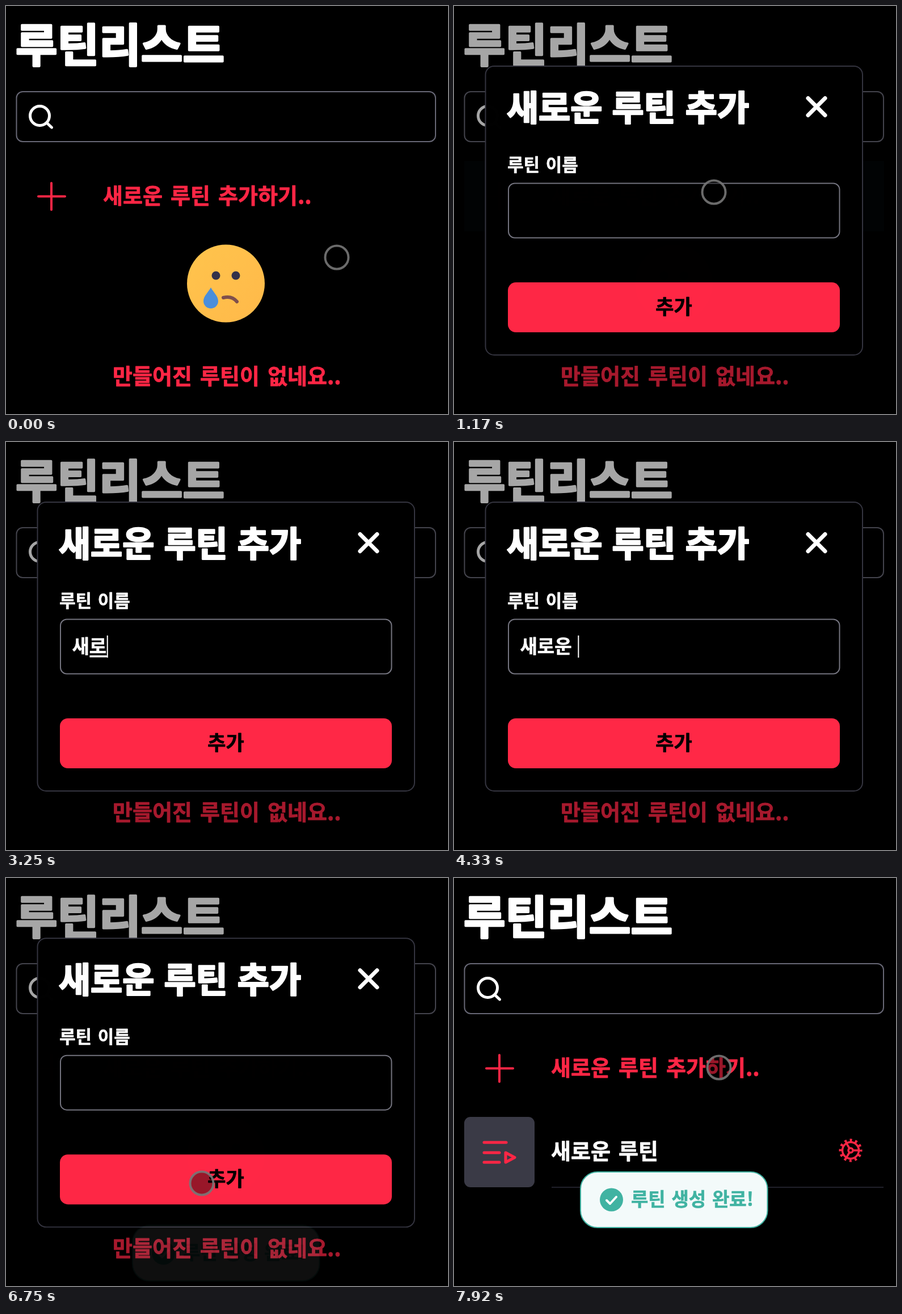
An HTML page for the animation above (8000 ms loop, 779x719 px).

```html
<!DOCTYPE html>
<html lang="ko">
<head>
<meta charset="utf-8">
<title>루틴리스트</title>
<style>
  html, body { margin: 0; width: 779px; height: 719px; overflow: hidden; background: #000; }
  svg { display: block; }
  text {
    font-family: "Noto Sans CJK KR", "Noto Sans CJK", "Noto Sans KR", sans-serif;
    font-weight: 900; font-size: 38px; word-spacing: 3.5px; white-space: pre;
    fill: var(--ink); stroke: var(--ink); stroke-width: .02em; stroke-linejoin: round;
  }
  .heavy { stroke-width: .045em; }
  .line { fill: none; stroke: var(--ink); stroke-linecap: round; stroke-linejoin: round; }
  .white { --ink: #fff; }
  .red { --ink: #ff2645; }
  .teal { --ink: #40b3a2; }
  .black { --ink: #000; }

  /* 1% = 80ms */
  svg [id] { animation: 8s infinite linear both; }
  #press { animation-name: press; }
  #empty { animation-name: empty; }
  #list { animation-name: list; }
  #dim { animation-name: dim; }
  #modal { animation-name: modal; }
  #toast { animation-name: toast; }
  #cursor { animation-name: cursor; }

  @keyframes press {
    0%, 8.1% { opacity: 0; }
    8.6%, 12.5% { opacity: 1; }
    15%, 100% { opacity: 0; }
  }
  @keyframes empty {
    0% { visibility: visible; animation-timing-function: step-end; }
    84.9%, 100% { visibility: hidden; }
  }
  @keyframes list {
    0% { visibility: hidden; animation-timing-function: step-end; }
    84.9%, 100% { visibility: visible; }
  }
  @keyframes dim {
    0%, 9.3% { opacity: 0; animation-timing-function: cubic-bezier(.16, .84, .44, 1); }
    14.7%, 84.25% { opacity: .35; animation-timing-function: cubic-bezier(.56, 0, .84, .16); }
    89.6%, 100% { opacity: 0; }
  }
  @keyframes modal {
    0%, 9.3% { opacity: 0; transform: translateY(100px); animation-timing-function: ease-in-out; }
    14.7%, 84.25% { opacity: 1; transform: none; animation-timing-function: ease-in-out; }
    89.6%, 100% { opacity: 0; transform: translateY(100px); }
  }
  @keyframes toast {
    0%, 83.2% { opacity: 0; transform: translateY(100px); animation-timing-function: ease-in-out; }
    90.14%, 100% { opacity: 1; transform: none; }
  }
  @keyframes cursor {
    0%, 1% { transform: translate(583px, 443px); animation-timing-function: ease-in-out; }
    8.75%, 18% { transform: translate(458px, 328px); animation-timing-function: ease-in; }
    26% { transform: translate(556px, 388px); animation-timing-function: ease-out; }
    28.5% { transform: translate(566px, 394px); opacity: 1; }
    34.3% { opacity: 1; animation-timing-function: step-end; }
    34.4% { opacity: 0; }
    74.9% { opacity: 0; animation-timing-function: step-end; }
    75% { transform: translate(566px, 394px); opacity: 1; animation-timing-function: ease-in-out; }
    82%, 88% { transform: translate(345px, 538px); animation-timing-function: ease-in-out; }
    95%, 100% { transform: translate(467px, 334px); }
  }
</style>
</head>
<body>
<svg width="779" height="719" viewBox="0 0 779 719">
  <defs>
    <linearGradient id="face" x2="1" y2="1">
      <stop stop-color="#ffc44c"/><stop offset="1" stop-color="#ffb94a"/>
    </linearGradient>
  </defs>
  <rect width="779" height="719"/>

  <g class="white">
    <text class="heavy" x="17" y="98" style="font-size:80px">루틴리스트</text>
    <rect x="18.5" y="151" width="738.5" height="88" rx="11" fill="none" stroke="#686876" stroke-width="2"/>
    <g class="line" stroke-width="5">
      <circle cx="59.5" cy="193.5" r="17"/>
      <path d="M72 206l8.5 8"/>
    </g>
  </g>

  <rect id="press" x="18" y="273" width="740" height="124" fill="#121b2a"/>
  <g class="red">
    <path class="line" stroke-width="4" d="M80 312v47M57 335.500h47"/>
    <text x="171" y="348">새로운 루틴 추가하기..</text>
  </g>

  <g id="empty" class="red">
    <circle cx="387.500" cy="489" r="68.500" fill="url(#face)"/>
    <g fill="#34324a"><circle cx="370" cy="475" r="7.5"/><circle cx="405" cy="475" r="7.5"/></g>
    <path d="M383 514Q398 510 407 521" fill="none" stroke="#7f4f4c" stroke-width="6" stroke-linecap="round"/>
    <path d="M361 496C365 504 374 511 374 520A13 13 0 0 1 348 520C348 511 357 504 361 496Z" fill="#4a8edb"/>
    <text x="188" y="666">만들어진 루틴이 없네요..</text>
  </g>

  <g id="list">
    <rect x="18" y="421" width="124" height="124" rx="11" fill="#3a3a46"/>
    <path d="M172 545H757" stroke="#2b2b38" stroke-width="1.500"/>
    <text class="white" x="171" y="495">새로운 루틴</text>
    <g class="red">
      <path class="line" stroke-width="5" d="M53 466H92M53 484H80M53 501H80M91 484L107 492.500L91 501Z"/>
      <g class="line" transform="translate(699 480)" stroke-width="3.5">
        <circle r="14.500"/>
        <circle r="18" stroke-width="5" stroke-linecap="butt" stroke-dasharray="4 5.425" stroke-dashoffset="2"/>
        <circle r="4"/>
        <path d="M4 0H14M-2 -3.500L-7 -12M-2 3.500L-7 12"/>
      </g>
    </g>
  </g>

  <rect id="dim" width="779" height="719"/>

  <g id="modal" class="white">
    <rect x="55.500" y="106" width="664.500" height="509" rx="15" fill="#000" stroke="#353540" stroke-width="2"/>
    <text class="heavy" x="93" y="202" style="font-size:61px;word-spacing:0">새로운 루틴 추가</text>
    <path class="line" stroke-width="7" d="M624 162.500L654 192.500M654 162.500L624 192.500"/>
    <text x="94" y="290.500" style="font-size:31px;word-spacing:2px">루틴 이름</text>
    <rect x="96" y="312.500" width="583.500" height="96" rx="11" fill="none" stroke="#74747f" stroke-width="2"/>
    <text class="field" x="116.500" y="372" style="font-size:33px;word-spacing:1px"></text>
    <rect class="under" y="376" height="3.500" fill="#fff"/>
    <rect class="caret" y="341" width="2" height="39" fill="#fff"/>
    <rect x="95" y="487" width="585" height="88" rx="14" fill="#ff2846"/>
    <text class="black" x="387.500" y="543" text-anchor="middle" style="font-size:35px">추가</text>
  </g>

  <g id="toast" class="teal">
    <rect x="223" y="518" width="329.500" height="98" rx="30" fill="#f3fafa" stroke="#40b3a2" stroke-width="2"/>
    <circle cx="277.500" cy="567" r="20.500" fill="#40b3a2"/>
    <path d="M269 568l6 6l11-12" fill="none" stroke="#fff" stroke-width="4" stroke-linecap="round" stroke-linejoin="round"/>
    <text x="312" y="578" style="font-size:33px;word-spacing:1.500px">루틴 생성 완료!</text>
  </g>

  <circle id="cursor" r="20.500" fill="#000" fill-opacity=".4" stroke="#777" stroke-opacity=".9" stroke-width="4"/>
</svg>
<script>
  const LOOP = 8000, LEFT = 117;
  const [field, under, caret] = ['.field', '.under', '.caret'].map(s => document.querySelector(s));

  // [time, field content]; the last syllable is underlined while it is composed
  const steps = [
    [0, ''], [2750, 'ㅅ'], [2920, '새'], [3090, '샐'], [3250, '새로'], [3420, '새롱'],
    [3750, '새로우'], [3920, '새로운'], [4200, '새로운 '],
    [4500, '새로운 ㄹ'], [4670, '새로운 루'], [4920, '새로운 뤁'],
    [5170, '새로운 루티'], [5340, '새로운 루틴'], [6740, '']
  ];
  let shown = null;

  function type(value) {
    if (value === shown) return;
    shown = value;
    field.textContent = value;
    const n = value.length;
    const end = n && field.getSubStringLength(0, n);
    const start = n > 1 ? field.getSubStringLength(0, n - 1) : 0;
    const composing = n && !value.endsWith(' ');
    caret.setAttribute('x', LEFT + end);
    under.setAttribute('x', LEFT + start);
    under.setAttribute('width', composing ? end - start : 0);
  }

  const begin = performance.now();
  function draw() {
    const t = (performance.now() - begin) % LOOP;
    type(steps.filter(s => s[0] <= t).pop()[1]);
    caret.style.opacity = t > 1200 && t < 6740 ? 1 : 0;
    requestAnimationFrame(draw);
  }
  draw();
</script>
</body>
</html>
```
